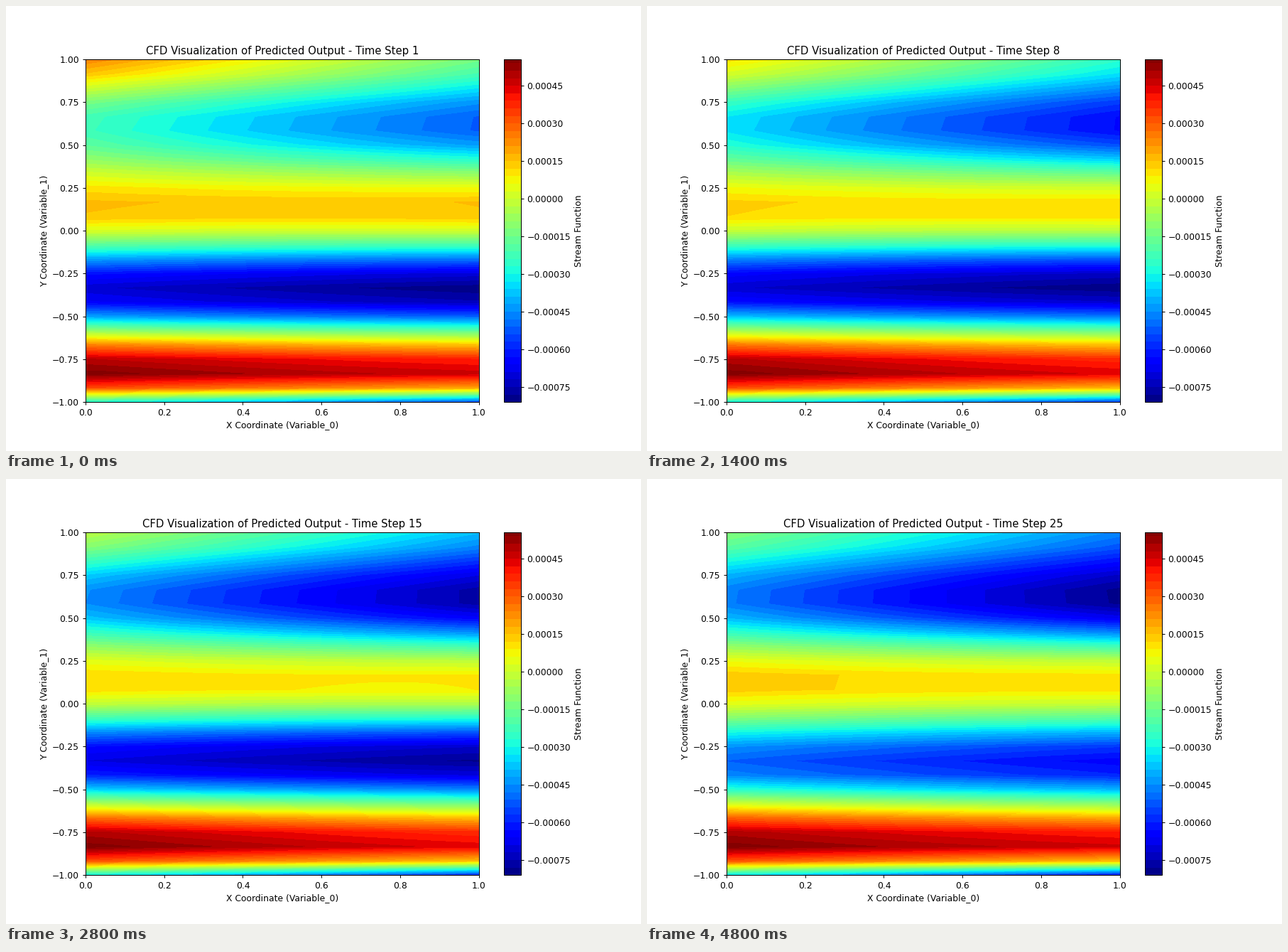
A matplotlib script for the animation above (5000 ms loop, 894 by 626 pixels).

```python
import numpy as np
import matplotlib.pyplot as plt
from matplotlib.animation import FuncAnimation

WIDTH, HEIGHT, DPI = 894, 626, 89.4
STEPS, INTERVAL = 25, 200
UNIT = 1e-6
LOW, HIGH = -810, 555

x = np.linspace(0, 1, 25)
y = np.linspace(-1, 1, 25)
bow = 4 * x * (1 - x)


def ridge(first, last, progress):
    """Values along x, moving from one (left, right) pair to another."""
    left, right = (a + (b - a) * progress for a, b in zip(first, last))
    return left + (right - left) * x


def field(step):
    """Stream function on the grid: eased between the ridges of the flow."""
    s = (step - 1) / (STEPS - 1)
    swell = np.sin(np.pi * s)
    late = s ** 4
    settling = np.sin(np.pi / 2 * min(1, s / .75)) ** 1.5
    easing_out = np.sin(np.pi / 2 * s) ** 1.2

    ridges = [
        (-1, ridge((-290, -560), (-340, -640), s)),
        (-.825, ridge((560, 465), (560, 460), s) - 10 * bow - 25 * swell * x),
        (-.35 + .02 * swell, ridge((-715, -806), (-515, -650), late) - 8 * bow),
        (.125, ridge((164, 164), (150, 117), s) - 10 * bow - 29 * swell),
        (.62, ridge((-238, -525), (-480, -800), settling) - 12 * bow),
        (1.05, ridge((255, -130), (-100, -450), easing_out)),
    ]
    heights = np.array([height for height, _ in ridges])
    values = np.array([value for _, value in ridges])

    lower = np.searchsorted(heights, y, side="right") - 1
    t = (y - heights[lower]) / (heights[lower + 1] - heights[lower])
    # The wall layer at the bottom rises steeply; all else is a cosine wave.
    blend = np.where(lower == 0, 1 - (1 - t) ** 2, (1 - np.cos(np.pi * t)) / 2)
    z = values[lower] + (values[lower + 1] - values[lower]) * blend[:, None]
    return np.clip(z, LOW + 1, HIGH - 1) * UNIT


levels = np.append(np.arange(LOW, HIGH, 30), HIGH) * UNIT

plt.rcParams["font.family"] = "DejaVu Sans"
fig, ax = plt.subplots(
    figsize=((WIDTH + .001) / DPI, (HEIGHT + .001) / DPI), dpi=DPI)


def draw_contours(step):
    return ax.contourf(x, y, field(step), levels=levels, cmap="jet",
                       vmin=LOW * UNIT, vmax=HIGH * UNIT)


contours = draw_contours(1)
bar = fig.colorbar(contours, ax=ax, spacing="proportional",
                   ticks=np.arange(-750, 451, 150) * UNIT)
bar.set_label("Stream Function")
ax.set_xlabel("X Coordinate (Variable_0)", labelpad=3.2)
ax.set_ylabel("Y Coordinate (Variable_1)")
ax.set_xlim(0, 1)
ax.set_ylim(-1, 1)


def update(frame):
    global contours
    contours.remove()
    contours = draw_contours(frame + 1)
    ax.set_title(f"CFD Visualization of Predicted Output - Time Step {frame + 1}")
    return []


anim = FuncAnimation(fig, update, frames=STEPS, interval=INTERVAL,
                     repeat=True, repeat_delay=0, blit=False)
plt.show()
```
